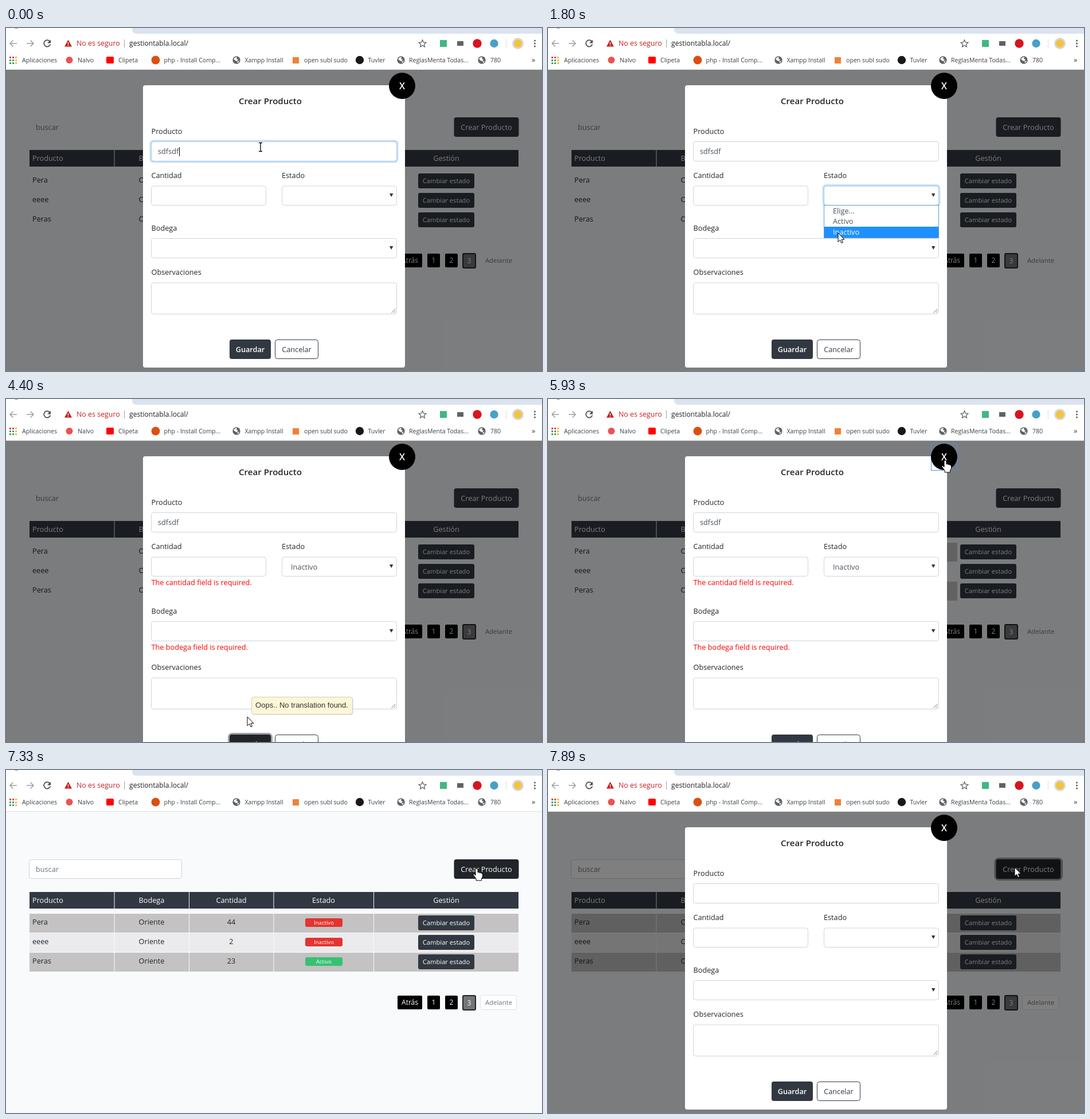
Write an HTML page that moves like this. It is 935 px wide and 599 px high and loops after 8 s.

```html
<!DOCTYPE html>
<html lang="es">
<head>
<meta charset="utf-8">
<title>Crear Producto</title>
<style>
html, body { margin: 0; width: 100%; height: 100%; overflow: hidden; background: #fff; }
svg { display: block; width: 935px; height: 599px; font-family: "Open Sans", "Noto Sans", sans-serif; }
text { white-space: pre; }
</style>
</head>
<body>
<svg id="stage" viewBox="0 0 935 599"></svg>
<script>
const DARK = '#323841', HOVER = '#212429', INK = '#212529', GREY = '#495057';

const text = (x, y, s, size = 12.7, fill = INK, anchor = 'start', extra = '') =>
  `<text x="${x}" y="${y}" font-size="${size}" fill="${fill}" text-anchor="${anchor}" ${extra}>${s}</text>`;
const rect = (x, y, w, h, fill, r = 0, extra = '') =>
  `<rect x="${x}" y="${y}" width="${w}" height="${h}" rx="${r}" fill="${fill}" ${extra}/>`;
const circle = (x, y, r, fill) => `<circle cx="${x}" cy="${y}" r="${r}" fill="${fill}"/>`;
const line = (d, stroke, w = 1) =>
  `<path d="${d}" fill="none" stroke="${stroke}" stroke-width="${w}"/>`;
const group = (id, body) => `<g id="${id}">${body}</g>`;
const field = (x, y, w, h) => rect(x, y, w, h, '#fff', 4, 'stroke="#ced4da"');
const focus = (id, x, y, w, h) => group(id,
  rect(x - 1.5, y - 1.5, w + 3, h + 3, 'none', 5, 'stroke="#c9e0f5" stroke-width="3"') +
  rect(x, y, w, h, 'none', 4, 'stroke="#a1cbef"'));
const caretDown = y => `<path d="M669 ${y}h6.4l-3.2 6z" fill="#333"/>`;
const globe = x => circle(x, 56, 6.7, '#5f6368') +
  `<path d="M${x - 5} 54q3-4 6-3l-1 3 3 1-2 3-3-1zM${x + 1} 59l4-2-2 4z" fill="#fff"/>`;

function browserBar() {
  const grid = ['#e8453c', '#e8453c', '#f9bb2d', '#3aa757', '#4688f1', '#f9bb2d', '#3aa757', '#3aa757', '#f9bb2d']
    .map((c, i) => rect(6 + i % 3 * 5, 50 + (i / 3 | 0) * 5, 3, 3, c)).join('');
  const label = (x, s) => text(x, 60, s, 10.6, '#3c4043');
  return rect(0, 0, 935, 73, '#fff') +
    '<path d="M220 0H935V10H228Q220 10 220 2z" fill="#dae3ee"/>' +
    line('M15 0q3 1 6 0', '#888') +
    line('M19 27H7M12.5 21.5L7 27l5.5 5.5', '#9aa0a6', 1.5) +
    line('M36 27H48M42.5 21.5L48 27l-5.5 5.5', '#9aa0a6', 1.5) +
    line('M76.5 23.5A5.7 5.7 0 1 0 77.3 28.5', '#4a4d51', 1.8) +
    '<path d="M78 20.5v6h-6z" fill="#4a4d51"/>' +
    '<path d="M108.5 20.5l6.5 12H102z" fill="#c5221f"/>' +
    line('M108.5 25v3.5M108.5 29.6v1.5', '#fff', 1.3) +
    text(123, 31, 'No es seguro', 12.4, '#c5221f') +
    line('M206.5 20V34', '#9aa0a6') +
    text(215, 31, 'gestiontabla.local/', 12.1, '#202124') +
    '<path d="M726.5 20.8l1.8 4.2 4.5.4-3.4 3 1 4.4-3.9-2.3-3.9 2.3 1-4.4-3.4-3 4.5-.4z" fill="none" stroke="#5f6368" stroke-width="1.3"/>' +
    rect(757, 21, 12, 12, '#41b883') +
    rect(787, 23, 11, 8, '#5f6368') +
    circle(822, 27, 7.7, '#d9141e') +
    circle(851.5, 27, 7.2, '#4a9fc9') +
    line('M872.5 19V35', '#dadce0') +
    circle(893, 27, 10, '#d5d7db') + circle(893, 27, 7, '#f5c33b') +
    [22, 27, 32].map(y => circle(922.5, y, 1.6, '#5f6368')).join('') +
    grid + label(28, 'Aplicaciones') +
    circle(110.5, 56, 6, '#ec5252') + label(125, 'Nalvo') +
    rect(175, 50, 13, 12, '#f00', 2) + label(196, 'Clipeta') +
    circle(261, 56, 7.5, '#dd4f10') + label(275.5, 'php - Install Comp...') +
    globe(402) + label(416.5, 'Xampp Install') +
    rect(500, 51, 11, 11, '#ef8236') + label(520, 'open subl sudo') +
    circle(617, 56, 7.2, '#191717') + label(631.5, 'Tuvler') +
    globe(689) + label(703, 'ReglasMenta Todas...') +
    globe(830) + label(845, '780') +
    text(917, 60, '»', 13, '#3c4043') +
    rect(0, 72, 935, 1, '#dcdee1');
}

function page() {
  const cols = [41, 189, 319.5, 467, 641.5, 894];
  const mid = [0, 254, 393, 554, 768];
  const heads = ['Producto', 'Bodega', 'Cantidad', 'Estado', 'Gestión'];
  const rows = [['Pera', 44, 'Inactivo'], ['eeee', 2, 'Inactivo'], ['Peras', 23, 'Activo']];
  const splits = (y, h) => cols.slice(1, 5).map(x => rect(x - .5, y, 1, h, '#f8fafc')).join('');
  const stripes = rows.map((_, i) =>
    rect(41, 251 + 34 * i, 853, 33, i % 2 ? '#ebebed' : '#c4c2c2')).join('') + splits(250, 103);
  const body = rows.map(([name, qty, state], i) => {
    const y = 251 + 34 * i;
    return text(46, y + 18.5, name) +
      text(254, y + 18.5, 'Oriente', 12.7, INK, 'middle') +
      text(393, y + 18.5, qty, 12.7, INK, 'middle') +
      rect(522, y + 8, 65, 15, state === 'Activo' ? '#38c172' : '#e3342f', 3) +
      text(554.5, y + 18.5, state, 9.6, '#fff', 'middle') +
      rect(719, y + 3, 98, 26, DARK, 3) +
      text(768, y + 20, 'Cambiar estado', 11.2, '#fff', 'middle');
  }).join('');
  const pager = (x, w, s) => rect(x, 394, w, 24, '#000', 2) +
    text(x + w / 2, 410, s, 12, '#fff', 'middle');
  return rect(0, 73, 935, 526, '#f8fafc') +
    group('frames', field(40.5, 156.5, 266, 33) + stripes +
      rect(827.5, 393.5, 63, 25, '#fff', 3, 'stroke="#dee2e6"')) +
    text(52, 178, 'buscar', 12.7, '#6c757d') +
    rect(780, 154.5, 116.5, 37, 'none', 6, 'id="newRing" stroke="#9ea2a6" stroke-width="3"') +
    rect(781.5, 156, 113, 34, DARK, 4, 'id="newButton"') +
    text(838, 177.5, 'Crear Producto', 12.7, '#fff', 'middle') +
    rect(41, 213, 853, 29, DARK) + splits(213, 29) +
    heads.map((s, i) => text(i ? mid[i] : 46, 231.5, s, 12.7, '#fff', i ? 'middle' : 'start')).join('') +
    body + pager(683, 43, 'Atrás') + pager(735, 22, '1') + pager(766, 22, '2') +
    rect(797, 394, 22, 25, '#757577', 2, 'stroke="#212529" stroke-width="2"') +
    text(808, 410.5, '3', 12, '#fff', 'middle') +
    text(859.5, 410, 'Adelante', 11.4, '#6c757d', 'middle');
}

function modal() {
  return rect(0, 73, 935, 526, 'rgba(0,0,0,.5)') +
    group('patches', rect(696, 251, 18, 33, '#636262') + rect(696, 319, 18, 33, '#636262')) +
    rect(239, 100, 457, 493, '#fff', 4, 'id="panel"') +
    text(461, 133, 'Crear Producto', 15.1, INK, 'middle', 'font-weight="600"') +
    text(253.5, 185, 'Producto') + field(253.5, 198.5, 428, 34) +
    focus('nameFocus', 253.5, 198.5, 428, 34) + text(265, 220, 'sdfsdf', 12.7, GREY, 'start', 'id="name"') +
    rect(302, 208, 1, 16, '#000', 0, 'id="caret"') +
    text(253.5, 262, 'Cantidad') + field(253.5, 276, 200, 33.5) +
    text(481, 262, 'Estado') + field(481.5, 276, 200, 33.5) +
    focus('stateFocus', 481.5, 276, 200, 33.5) + caretDown(289) +
    text(497, 298, 'Inactivo', 12.7, GREY, 'start', 'id="state"') +
    group('errors', text(253.5, 324.5, 'The cantidad field is required.', 12.7, '#f00') +
      text(253.5, 437.5, 'The bodega field is required.', 12.7, '#f00')) +
    group('store', text(253.5, 354, 'Bodega') + field(253.5, 367.5, 428, 34) + caretDown(381)) +
    group('rest', text(253.5, 431, 'Observaciones') + field(253.5, 445, 428, 54.5) +
      line('M672.5 497.5l7-7M676.5 497.5l3-3', '#777') +
      rect(388.5, 542.5, 75, 37, 'none', 6, 'id="saveRing" stroke="#9ea2a6" stroke-width="3"') +
      rect(390, 544, 72, 34, DARK, 4, 'id="saveButton"') +
      text(426, 565.5, 'Guardar', 12.7, '#fff', 'middle', 'font-weight="600"') +
      rect(469.5, 544.5, 75, 33, '#fff', 4, `stroke="${DARK}"`) +
      text(507, 565.5, 'Cancelar', 12.7, DARK, 'middle')) +
    group('menu', rect(481.5, 309.5, 200, 57, '#fff', 0, 'stroke="#5c9ad6"') +
      rect(482, 347, 199, 19, '#1e90ff', 0, 'id="pick"') +
      ['Elige...', 'Activo', 'Inactivo'].map((s, i) =>
        text(497, 324 + 18.3 * i, s, 12.7, GREY, 'start', 'class="option"')).join('')) +
    rect(668.5, 78.5, 45, 46, 'none', 0, 'id="closeFocus" stroke="#4d90e0"') +
    circle(691, 101, 23, '#000') +
    text(691, 107, 'X', 16, '#fff', 'middle', 'font-weight="600"') +
    group('tip', rect(429, 521.5, 176.5, 30, 'rgba(0,0,0,.15)', 4) +
      rect(428.5, 520.5, 176, 30, '#fdf6d8', 4, 'stroke="#d3cfbb"') +
      text(516, 539, 'Oops.. No translation found.', 13, '#333', 'middle', 'font-family="Liberation Sans, sans-serif"'));
}

const cursors = group('cursor',
  '<path id="arrow" d="M0 0V15.5L3.6 12.2 6 17.6 8.4 16.5 6.1 11.3H11z" fill="#fff" stroke="#000"/>' +
  '<path id="hand" d="M-2 1Q0-1 2 1V7Q4 5.5 5 7.5 7 6.5 8 8.5 10 8 10.5 10V14L8.5 18V21H-1V18L-6 11Q-6 8.5-4 9.5L-2 12z" fill="#fff" stroke="#000"/>' +
  '<path id="beam" d="M-3-7.5H-1Q0-7.5 0-6.5 0-7.5 1-7.5H3M0-7V7M-3 7.5H-1Q0 7.5 0 6.5 0 7.5 1 7.5H3" fill="none" stroke="#000" stroke-width="1.3"/>');

const stage = document.getElementById('stage');
stage.innerHTML = group('page', page()) + group('modal', modal()) + browserBar() + cursors;
const el = Object.fromEntries([...stage.querySelectorAll('[id]')].map(e => [e.id, e]));
const options = stage.querySelectorAll('.option');

// Each move: start, end, number of jumps, destination.
const moves = [
  [410, 840, 4, 540, 292], [980, 1410, 4, 508, 352], [1530, 1800, 3, 506, 358],
  [1940, 2070, 2, 505, 360], [2760, 3300, 5, 421, 560], [4000, 4000, 1, 421, 555],
  [4520, 4700, 2, 561, 340], [5110, 5530, 4, 693, 107], [6610, 7330, 6, 821, 172],
  [7750, 7750, 1, 814, 170]
];
function pointer(t) {
  let x = 444, y = 208;
  for (const [start, end, jumps, toX, toY] of moves) {
    if (t < start) break;
    const k = Math.floor((t - start) / (end - start || 1) * (jumps - 1)) + 1;
    const p = Math.min(1, k / jumps);
    x += (toX - x) * p;
    y += (toY - y) * p;
  }
  return [x, y];
}

const show = (id, on) => el[id].setAttribute('visibility', on ? 'visible' : 'hidden');
const shift = (id, y) => el[id].setAttribute('transform', `translate(0 ${y})`);

function draw(t) {
  const within = (a, b) => t >= a && t < b;
  const [x, y] = pointer(t);
  const open = t < 6050 || t >= 7610;
  const opacity = !open ? 0 : within(7610, 7750) ? .2 : within(7750, 7890) ? .7 : 1;
  const errors = within(3850, 7610);
  const saveFocused = within(3450, 5660);

  el.modal.setAttribute('opacity', opacity);
  el.modal.setAttribute('display', open ? 'inline' : 'none');
  show('frames', t >= 6050);
  show('patches', within(5930, 6050));
  show('nameFocus', t < 980);
  show('caret', t < 980);
  show('name', t < 7610);
  show('stateFocus', within(980, 3450));
  show('state', within(2350, 7610));
  show('errors', errors);
  show('tip', within(4400, 4520));
  show('closeFocus', within(5660, 6050));
  show('saveRing', saveFocused);
  show('newRing', t >= 7610);
  el.panel.setAttribute('height', errors ? 535 : 493);
  shift('store', errors ? 21 : 0);
  shift('rest', errors ? 42 : 0);

  el.menu.setAttribute('display', within(980, 2350) ? 'inline' : 'none');
  const picked = Math.max(0, Math.min(2, Math.floor((y - 310) / 18.5)));
  el.pick.setAttribute('y', 310 + 18.5 * picked);
  options.forEach((o, i) => o.setAttribute('fill', i === picked ? '#fff' : GREY));

  const onSave = !errors && open && y > 544 && x > 390 && x < 462;
  const onNew = t > 6050 && x > 782 && y > 156;
  const onClose = within(5110, 6050) && Math.hypot(x - 691, y - 101) < 23;
  el.saveButton.setAttribute('fill', onSave || saveFocused ? HOVER : DARK);
  el.newButton.setAttribute('fill', onNew ? HOVER : DARK);

  const hand = onSave || onClose || within(3850, 4000) || (onNew && t < 7750);
  const beam = t < 980 && y < 233;
  show('hand', hand);
  show('beam', beam);
  show('arrow', !hand && !beam);
  el.cursor.setAttribute('transform', `translate(${x} ${y})`);
}

function tick() {
  draw(performance.now() % 8000);
  requestAnimationFrame(tick);
}
tick();
</script>
</body>
</html>
```
